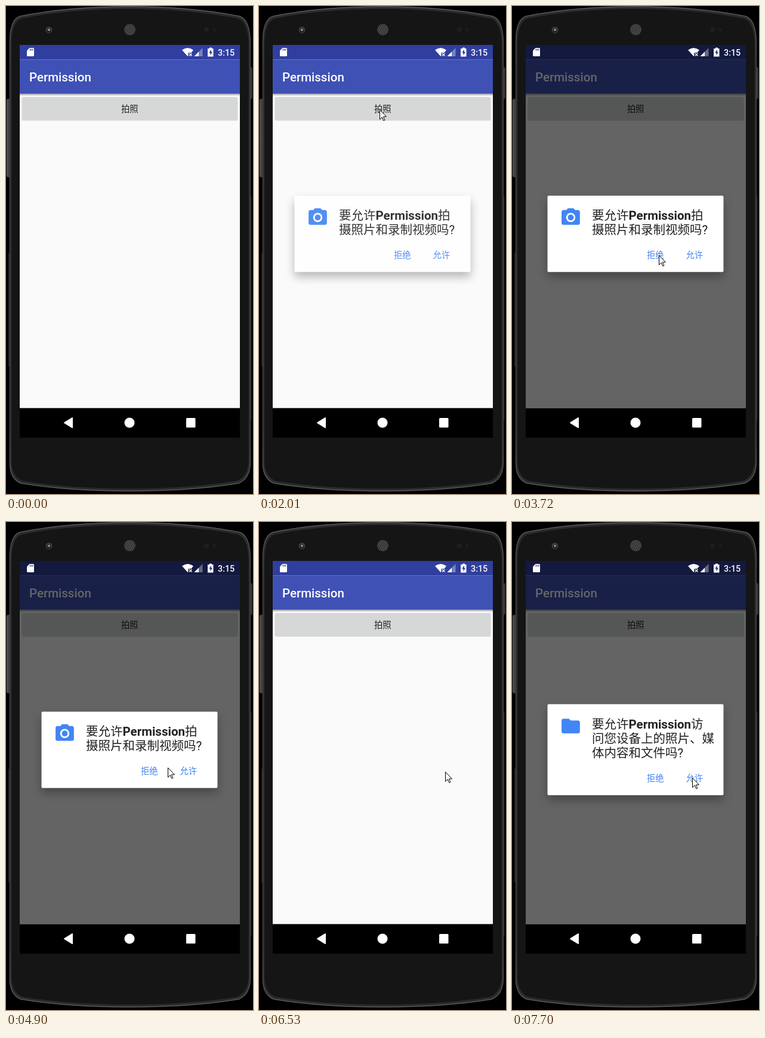
Write an HTML page that moves like this. It is 414 by 815 pixels and loops after 8 s.

```html
<!DOCTYPE html>
<html lang="zh-CN">
<head>
<meta charset="utf-8">
<title>Permission dialogs</title>
<style>
  html, body { margin: 0; width: 100%; height: 100%; overflow: hidden; background: #000; }
  svg { display: block; width: 414px; height: 815px; }
  text { font-family: Roboto, "Noto Sans CJK SC", "Noto Sans CJK", sans-serif; font-size: 14.35px; }
  .title { font-size: 20.5px; font-weight: 500; fill: #fff; }
  .message { font-size: 20.5px; fill: #212121; }
  .message .app { font-weight: 700; }
  .action, .icon { fill: #4285f4; }
  .dialog { opacity: 0; filter: drop-shadow(0 8px 8px rgba(0, 0, 0, .3)); }
</style>
</head>
<body>
<svg viewBox="0 0 414 815">
  <defs>
    <linearGradient id="rim" x2="0" y2="1">
      <stop offset="0" stop-color="#5a5a5a"/>
      <stop offset=".12" stop-color="#404040"/>
      <stop offset=".88" stop-color="#404040"/>
      <stop offset="1" stop-color="#5a5a5a"/>
    </linearGradient>
    <linearGradient id="key">
      <stop offset="0" stop-color="#555"/>
      <stop offset="1" stop-color="#2c2c2c"/>
    </linearGradient>
    <linearGradient id="shade" x2="0" y2="1">
      <stop offset="0" stop-opacity=".35"/>
      <stop offset="1" stop-opacity="0"/>
    </linearGradient>
    <pattern id="mesh" width="3" height="3" patternUnits="userSpaceOnUse" patternTransform="rotate(30)">
      <rect width="3" height="3" fill="#555"/>
      <circle cx="1.5" cy="1.5" r="1.05" fill="#151515"/>
    </pattern>
    <clipPath id="buttonClip"><rect x="27" y="153" width="361" height="36" rx="2"/></clipPath>
    <path id="body" d="M6.500 60Q6.500 22 24 17Q104 1 207 1Q310 1 391 17Q408.500 22 409.500 60V762Q409 789 390 797Q310 810 207 810Q104 810 25 797Q6 789 6.500 762Z"/>
  </defs>

  <!-- Phone body -->
  <rect x="1" y="155" width="7" height="131" rx="3" fill="url(#key)"/>
  <rect x="406" y="102" width="7" height="53" rx="3" fill="url(#key)"/>
  <path d="M5 412V602M410.500 318V692" stroke="#2c2c2c" stroke-width="1.500"/>
  <use href="#body" fill="#2b2b2b" stroke="url(#rim)" stroke-width="1.500"/>
  <use href="#body" fill="#151515" transform="translate(207 405.500) scale(.986 .99) translate(-207 -405.500)"/>
  <circle cx="72" cy="40" r="5.500" fill="#3b3d42"/>
  <circle cx="72" cy="41" r="3.300" fill="#17191f"/>
  <circle cx="72" cy="40" r="2" fill="#8b909c"/>
  <circle cx="207.500" cy="39.500" r="9.500" fill="url(#mesh)"/>
  <circle cx="336" cy="39.500" r="4" fill="#1e1e1e"/>
  <circle cx="349" cy="39.500" r="2.500" fill="#1e1e1e"/>

  <!-- App -->
  <rect x="23" y="65" width="369" height="656"/>
  <rect x="23" y="89" width="369" height="582.500" fill="#fafafa"/>
  <rect x="23" y="65" width="369" height="24.500" fill="#303f9f"/>
  <rect x="23" y="89.500" width="369" height="57" fill="#3f51b5"/>
  <rect x="23" y="146.500" width="369" height="4" fill="url(#shade)"/>
  <text class="title" x="39" y="126">Permission</text>
  <rect x="26.500" y="153" width="362" height="38.500" rx="2.500" opacity=".14"/>
  <rect x="27" y="152" width="361" height="38" rx="2" fill="#d6d7d7"/>
  <g clip-path="url(#buttonClip)"><circle id="ripple" cx="203" cy="171" r="34"/></g>
  <text x="193" y="177" fill="#212121">拍照</text>
  <rect id="dim" x="23" y="65" width="369" height="606.500"/>

  <!-- Status and navigation icons -->
  <g fill="#fff">
    <path d="M39.500 70H45.500Q47 70 47 71.500V82.500Q47 84 45.500 84H36.500Q35 84 35 82.500V74.500Z"/>
    <path d="M40.300 71.500v3M42.500 71.500v3M44.700 71.500v3" stroke="#303f9f" stroke-width="1.200"/>
    <path d="M295 73.500Q304.500 66.500 314 73.500L310.500 78H305.500V82.500L304.500 84Z"/>
    <path d="M307 79l4.500 4.500M311.500 79l-4.500 4.500" stroke="#fff" stroke-width="1.400"/>
    <path d="M329.500 70V84H315.500Z" opacity=".35"/>
    <path d="M323 76.500V84H315.500Z"/>
    <path d="M341 69.500h4v1.500h2.500v13.500h-9.500V71h3Z"/>
    <path d="M343.800 72.500l-3.500 5.800h2.200v4.200l3.400-5.800h-2.100Z" fill="#26328a"/>
    <text x="355" y="82.500" font-weight="500">3:15</text>
    <path d="M98 696L111 688V704Z" stroke="#fff" stroke-width="2" stroke-linejoin="round"/>
    <circle cx="207" cy="696" r="8.500"/>
    <rect x="302" y="688" width="15.500" height="16" rx="1.500"/>
  </g>

  <g id="dialogs"></g>
  <g id="pointer">
    <circle id="halo" cy="-1" r="15" fill="#f4f000" opacity=".62"/>
    <path id="arrow" d="M.5 .5V16.300L4.300 12.700L6.800 18.500L8.900 17.600L6.500 11.900H11.500Z" stroke="#000"/>
  </g>
</svg>

<script>
const LOOP = 8000;
const TICK = 77.9;
const $ = id => document.getElementById(id);

const CAMERA = 'M9 2L7.170 4H4c-1.100 0-2 .9-2 2v12c0 1.100.9 2 2 2h16c1.100 0 2-.9 2-2V6c0-1.100-.9-2-2-2h-3.170L15 2H9z' +
  'm3 15c-2.760 0-5-2.240-5-5s2.240-5 5-5 5 2.240 5 5-2.240 5-5 5zm0-1.800a3.200 3.200 0 1 0 0-6.400 3.200 3.200 0 0 0 0 6.400z';
const FOLDER = 'M10 4H4c-1.100 0-2 .9-2 2v12c0 1.100.9 2 2 2h16c1.100 0 2-.9 2-2V8c0-1.100-.9-2-2-2h-8l-2-2z';

function dialog(id, top, icon, lines) {
  const height = 79 + 24.3 * lines.length;
  const app = '<tspan class="app">Permission</tspan>';
  const message = lines.map((line, i) =>
    `<text class="message" x="134" y="${40.3 + i * 24.2}">${line.replace('@', app)}</text>`).join('');
  $('dialogs').innerHTML += `<g class="dialog" id="${id}"><g transform="translate(0 ${top})">
    <rect x="59.500" width="295" height="${height}" rx="2" fill="#fff"/>
    <path class="icon" fill-rule="evenodd" transform="translate(80 18) scale(1.5375)" d="${icon}"/>
    ${message}
    <text class="action" x="226" y="${height - 23.5}">拒绝</text>
    <text class="action" x="291.5" y="${height - 23.5}">允许</text></g></g>`;
}
dialog('camera', 316.7, CAMERA, ['要允许@拍', '摄照片和录制视频吗?']);
dialog('files', 304.3, FOLDER, ['要允许@访', '问您设备上的照片、媒', '体内容和文件吗?']);

const during = (t, start, end) => t >= start && t < end;
const ticksSince = (t, start) => t < start ? 0 : Math.floor((t - start) / TICK + .1) + 1;

// Eased progress, held between ticks; the first step falls on start, the last on end.
function progress(t, start, end) {
  const p = Math.min(1, ticksSince(t, start) / (Math.round((end - start) / TICK) + 1));
  return p * p * (3 - 2 * p);
}
// Opacity of an opening dialog; `left` is the share still missing after each tick.
const appear = (t, start, left) => 1 - left ** ticksSince(t, start);

// Mouse trips, each bent towards a control point.
const trips = [
  { start: 200, end: 980, bend: [133, 400], to: [202, 175] },
  { start: 1130, end: 1130, bend: [202, 174], to: [202, 173] },
  { start: 2640, end: 3410, bend: [275, 310], to: [254, 408] },
  { start: 3490, end: 3720, bend: [250, 411], to: [246, 416] },
  { start: 4810, end: 5130, bend: [282, 402], to: [312, 417] },
  { start: 7390, end: 7700, bend: [307, 424], to: [302, 427] },
];
function mouseAt(t) {
  let at = [343, 777];
  for (const { start, end, bend, to } of trips) {
    const p = progress(t, start, end), q = 1 - p;
    at = at.map((from, k) => Math.round(q * q * from + 2 * p * q * bend[k] + p * p * to[k]));
  }
  return at;
}

function draw(t) {
  const pressed = during(t, 1070, 1300) || during(t, 6060, 6290);
  const closing = progress(t, 6370, 6530);
  const shown = (id, on) => $(id).setAttribute('visibility', on ? 'visible' : 'hidden');

  shown('pointer', t >= 200);
  shown('halo', pressed);
  $('pointer').setAttribute('transform', `translate(${mouseAt(t)})`);
  $('arrow').setAttribute('fill', pressed ? '#f8f661' : '#fff');
  $('ripple').style.opacity = during(t, 1460, 1850) ? .06 : 0;
  $('dim').style.opacity = .6 * (progress(t, 2090, 2160) - closing + progress(t, 6760, 6910));
  $('camera').style.opacity = appear(t, 2010, .09) * (1 - closing);
  $('files').style.opacity = appear(t, 6680, .3);
}

const begin = performance.now();
function frame() {
  draw((performance.now() - begin) % LOOP);
  requestAnimationFrame(frame);
}
frame();
</script>
</body>
</html>
```
